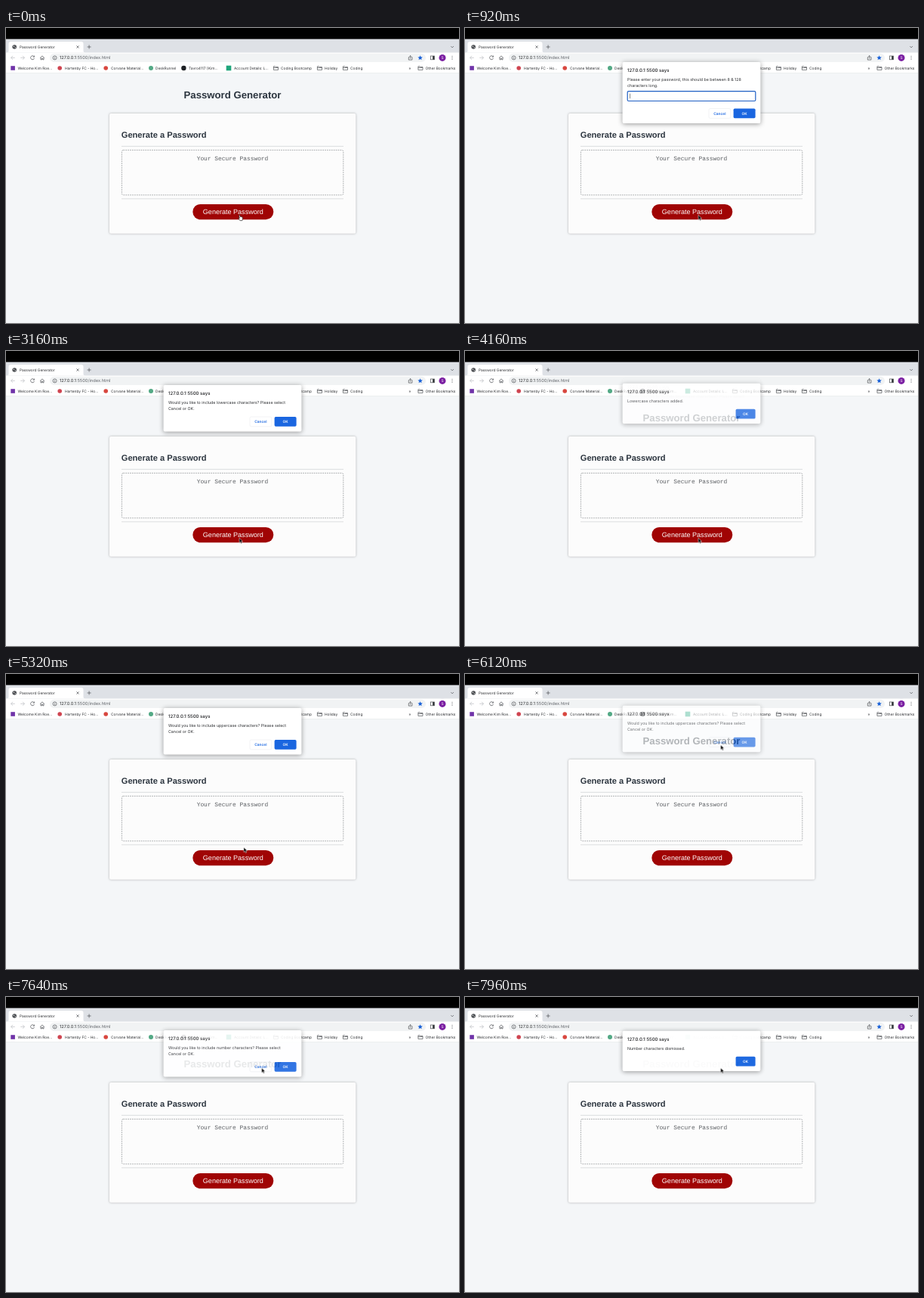
Animation, 600 px wide and 390 px high, one loop 8 s. Source, as an HTML page:

```html
<!DOCTYPE html>
<html lang="en">
<head>
<meta charset="utf-8">
<title>Password Generator</title>
<style>
@property --a { syntax: "<number>"; inherits: false; initial-value: 0; }
html, body { margin: 0; width: 100%; height: 100%; overflow: hidden; background: #f4f6f8; }
svg { display: block; }
text { font-family: Inter, Roboto, sans-serif; fill: #2b2d30; text-rendering: geometricPrecision; white-space: pre; }
.page { font-family: "Liberation Sans", Arial, sans-serif; fill: #2c353f; font-weight: 700; }
.mono { font-family: "Liberation Mono", monospace; fill: #5c5f63; }
.bar text { font-size: 4.85px; }
.icon { fill: none; stroke: #4c5054; stroke-width: .7; }
.card { filter: drop-shadow(0 .8px 1.6px rgba(0, 0, 0, .3)); }

/* Dialogs fade while sliding a few pixels from above */
.dialog {
  opacity: var(--a);
  transform: translateY(calc((var(--a) - 1) * 9px));
  animation: 8s linear infinite;
}
.dialog .box { fill: #fff; filter: drop-shadow(0 1.2px 3px rgba(0, 0, 0, .4)); }
.dialog text { font-size: 5.3px; }
.dialog .head { font-size: 6.05px; font-weight: 500; fill: #202124; }
.dialog .btn { font-size: 4.8px; font-weight: 600; text-anchor: middle; }
#length  { animation-name: length; }
#lower   { animation-name: lower; }
#lowerOk { animation-name: lowerOk; }
#upper   { animation-name: upper; }
#upperNo { animation-name: upperNo; }
#digit   { animation-name: digit; }
#digitNo { animation-name: digitNo; }
@keyframes length  { 0%, 8.5% { --a: 0 } 10.6%, 32.5% { --a: 1 } 35.3%, 100% { --a: 0 } }
@keyframes lower   { 0%, 33.9% { --a: 0 } 36%, 49.3% { --a: 1 } 52.2%, 100% { --a: 0 } }
@keyframes lowerOk { 0%, 50.5% { --a: 0 } 52.5%, 61.3% { --a: 1 } 64%, 100% { --a: 0 } }
@keyframes upper   { 0%, 62.5% { --a: 0 } 64.5%, 75.5% { --a: 1 } 78.3%, 100% { --a: 0 } }
@keyframes upperNo { 0%, 76.7% { --a: 0 } 78.7%, 85.45% { --a: 1 } 88.2%, 100% { --a: 0 } }
@keyframes digit   { 0%, 87.2% { --a: 0 } 89.2%, 95.2% { --a: 1 } 98%, 100% { --a: 0 } }
@keyframes digitNo { 0%, 97.5% { --a: 0 } 99.5% { --a: .98 } 100% { --a: 1 } }

.caret { animation: blink 8s step-end infinite; }
@keyframes blink { 0% { opacity: 1 } 16.5% { opacity: 0 } 22.75% { opacity: 1 } 29% { opacity: 0 } }

#hand { animation: hand 8s step-end infinite; }
@keyframes hand { 0% { opacity: 1 } 9.5% { opacity: 0 } }
#arrow { animation: show 8s step-end infinite, move 8s linear infinite; }
@keyframes show { 0% { opacity: 0 } 9.5% { opacity: 1 } }
@keyframes move {
  0%, 65% { transform: translate(309px, 247.3px) }
  66.5% { transform: translate(314.8px, 229.3px) }
  69%, 71% { transform: translate(320px, 206px); animation-timing-function: ease-in-out }
  75%, 100% { transform: translate(338.6px, 93.8px) }
}
</style>
</head>
<body>
<svg width="600" height="390" viewBox="0 0 600 390">
  <defs>
    <path id="folder" d="M-3 -2.2h2.3l.8 .8h3v3.8h-6.1zM-3 -.5h6" class="icon"/>
  </defs>
  <rect width="600" height="390" fill="#f4f6f8"/>

  <g class="bar">
    <rect width="600" height="60" fill="#fff"/>
    <rect y="14" width="600" height="18.5" fill="#dee1e6"/>
    <rect width="600" height="14.6" fill="#000"/>
    <path d="M1 32.6q2.5 0 2.5-2.5v-9q0-3 3-3h93q3 0 3 3v9q0 2.5 2.5 2.5z" fill="#fff"/>
    <path d="M0 59.6h600" stroke="#dfe1e4" stroke-width=".6"/>

    <circle cx="11.2" cy="25" r="2.8" fill="#4a4d51"/>
    <path d="M9.5 23.6l1.6 .5-.6 1.4zM11.8 26.8l.4-1.6 1.2.3z" fill="#fff"/>
    <text x="18" y="26.8">Password Generator</text>
    <g class="icon">
      <path d="M93.4 23.4l3.2 3.2m0-3.2l-3.2 3.2M107.6 25h5m-2.5-2.5v5M589.3 24.1l1.8 1.8 1.8-1.8"/>
      <path d="M11.8 39.3h-5.2m2.4-2.4l-2.4 2.4 2.4 2.4M19.3 39.3h5.2m-2.4-2.4l2.4 2.4-2.4 2.4" stroke="#b9bcc0"/>
      <path d="M37 37.6a2.5 2.5 0 1 0 .5 2.4M37.6 36.5v1.8h-1.8M45.2 39.4l2.8-2.5 2.8 2.5M46 39v2.9h1.3v-1.7h1.4v1.7h1.3v-2.9"/>
    </g>
    <rect x="58" y="33.8" width="498" height="11.2" rx="5.6" fill="#f1f3f4"/>
    <g class="icon">
      <circle cx="64.6" cy="39.4" r="2.5"/>
      <path d="M64.6 39.1v1.7m0-2.9v.6M534.4 38.6h-1.1v3.5h4.6v-3.5h-1.1M535.6 40.6v-4m-1.2 1.1l1.2-1.2 1.2 1.2"/>
      <rect x="562.4" y="37" width="5" height="4.8"/>
    </g>
    <rect x="565" y="37" width="2.4" height="4.8" fill="#3c4043"/>
    <text x="71" y="41.4" style="font-size:5.73px">127.0.0.1<tspan fill="#5f6368">:5500/index.html</tspan></text>
    <path d="M548.6 36.2l.9 2.1 2.3.2-1.7 1.5.5 2.2-2-1.2-2 1.2.5-2.2-1.7-1.5 2.3-.2z" fill="#1a62d8"/>
    <circle cx="578" cy="39.4" r="4.5" fill="#7b1fa2"/>
    <text x="578" y="41.2" text-anchor="middle" style="fill:#fff">S</text>
    <path d="M591 37.3v4.8" stroke="#4c5054" stroke-width="1.1" stroke-linecap="round" stroke-dasharray="0 2"/>

    <rect x="6.3" y="50.2" width="5.6" height="5.6" fill="#6f32a8"/>
    <circle cx="71.2" cy="53" r="2.8" fill="#cf4450"/>
    <circle cx="132.2" cy="53" r="2.8" fill="#d8473f"/>
    <circle cx="192" cy="53" r="3" fill="#53a985"/>
    <circle cx="235.4" cy="53" r="3.2" fill="#1d2024"/>
    <rect x="291.7" y="49.7" width="6.6" height="6.6" fill="#20a67c"/>
    <g id="links"></g>
    <text x="533.5" y="54.7">»</text>
  </g>

  <text class="page" x="300" y="93.2" text-anchor="middle" font-size="13.2">Password Generator</text>
  <rect class="card" x="137" y="113" width="326.3" height="158.8" rx="2" fill="#fcfcfc"/>
  <text class="page" x="152.8" y="144.8" font-size="11.1">Generate a Password</text>
  <path d="M153 156.4h294M153 225.8h294" stroke="#cfd1d3" stroke-width=".7"/>
  <rect x="153.4" y="161.4" width="293.4" height="59.4" rx="2" fill="#fcfcfc" stroke="#85888c" stroke-width=".7" stroke-dasharray="1.7 1.2"/>
  <text class="mono" x="300" y="175" text-anchor="middle" font-size="7.9">Your Secure Password</text>
  <rect x="247.3" y="232.9" width="107" height="20.3" rx="10.15" fill="#a00404"/>
  <text class="page" x="300.8" y="246.2" text-anchor="middle" font-size="9.05" style="font-weight:400;fill:#fff">Generate Password</text>

  <g id="dialogs"></g>

  <path id="hand" d="M308.6 247.4q.8-.6 1.2.3l.7 2 .9-.2 1.7.6q.7 1.7 .2 3l-.4 1.5h-3l-2.2-3q.2-.8 1.6.1z" fill="#fff" stroke="#111" stroke-width=".6"/>
  <path id="arrow" d="M0 0v6.4l1.5-1.4 1 2.3 1.2-.5-1-2.3h2z" fill="#000" stroke="#fff" stroke-width=".5"/>
</svg>
<script>
const put = (id, html) => document.getElementById(id).innerHTML = html;
const label = (x, y, str, cls = "") => `<text x="${x}" y="${y}" class="${cls}">${str}</text>`;

const links = [
  [15.5, "Welcome Kim Roe..."], [78, "Hartenby FC - Ho..."], [139, "Corvane Material..."],
  [198, "DeskRunnel"], [242, "Tavro4117 (Kim..."], [302, "Account Details: L..."],
  [364, "Coding Bootcamp", 1], [422, "Holiday", 1], [456, "Coding", 1], [555.5, "Other Bookmarks", 1]
];
put("links", links.map(([x, str, folder]) =>
  label(x, 54.8, str) + (folder ? `<use href="#folder" x="${x - 6.6}" y="53"/>` : "")).join(""));

function button(x, y, w, str, main) {
  const skin = main ? 'fill="#1a66e0"' : 'fill="#fff" stroke="#e4e7eb" stroke-width=".5"';
  return `<rect x="${x}" y="${y}" width="${w}" height="12.8" rx="1.7" ${skin}/>
    <text class="btn" x="${x + w / 2}" y="${y + 8.1}" style="fill:${main ? "#fff" : "#1a66e0"}">${str}</text>`;
}

const field = `<rect x="215.2" y="83.6" width="169.6" height="12.9" rx="1.5" fill="#fff" stroke="#1f5fc4" stroke-width="1.2"/>
  <path class="caret" d="M218.6 86.7v6.5" stroke="#222" stroke-width=".6"/>`;

function dialog(id, kind, ...lines) {
  const bottom = { prompt: 126, confirm: 106.5, alert: 98.2 }[kind];
  const top = bottom - 19.5;
  const keys = kind == "alert"
    ? button(358.6, top + .3, 26, "OK", true)
    : button(323, top, 28.8, "Cancel") + button(355.6, top, 29, "OK", true);
  return `<g class="dialog" id="${id}">
    <rect class="box" x="208.6" y="45" width="182.8" height="${bottom - 45}" rx="2"/>
    ${label(215, 58.4, "127.0.0.1:5500 says", "head")}
    ${lines.map((str, i) => label(215, 70.2 + i * 8, str)).join("")}
    ${kind == "prompt" ? field : ""}${keys}</g>`;
}
const ask = (id, what) => dialog(id, "confirm",
  `Would you like to include ${what} characters? Please select`, "Cancel or OK.");
const tell = (id, str) => dialog(id, "alert", str);

put("dialogs", [
  dialog("length", "prompt", "Please enter your password, this should be between 8 &amp; 128", "characters long."),
  ask("lower", "lowercase"),
  tell("lowerOk", "Lowercase characters added."),
  ask("upper", "uppercase"),
  tell("upperNo", "Uppercase characters dismissed."),
  ask("digit", "number"),
  tell("digitNo", "Number characters dismissed.")
].join(""));
</script>
</body>
</html>
```
